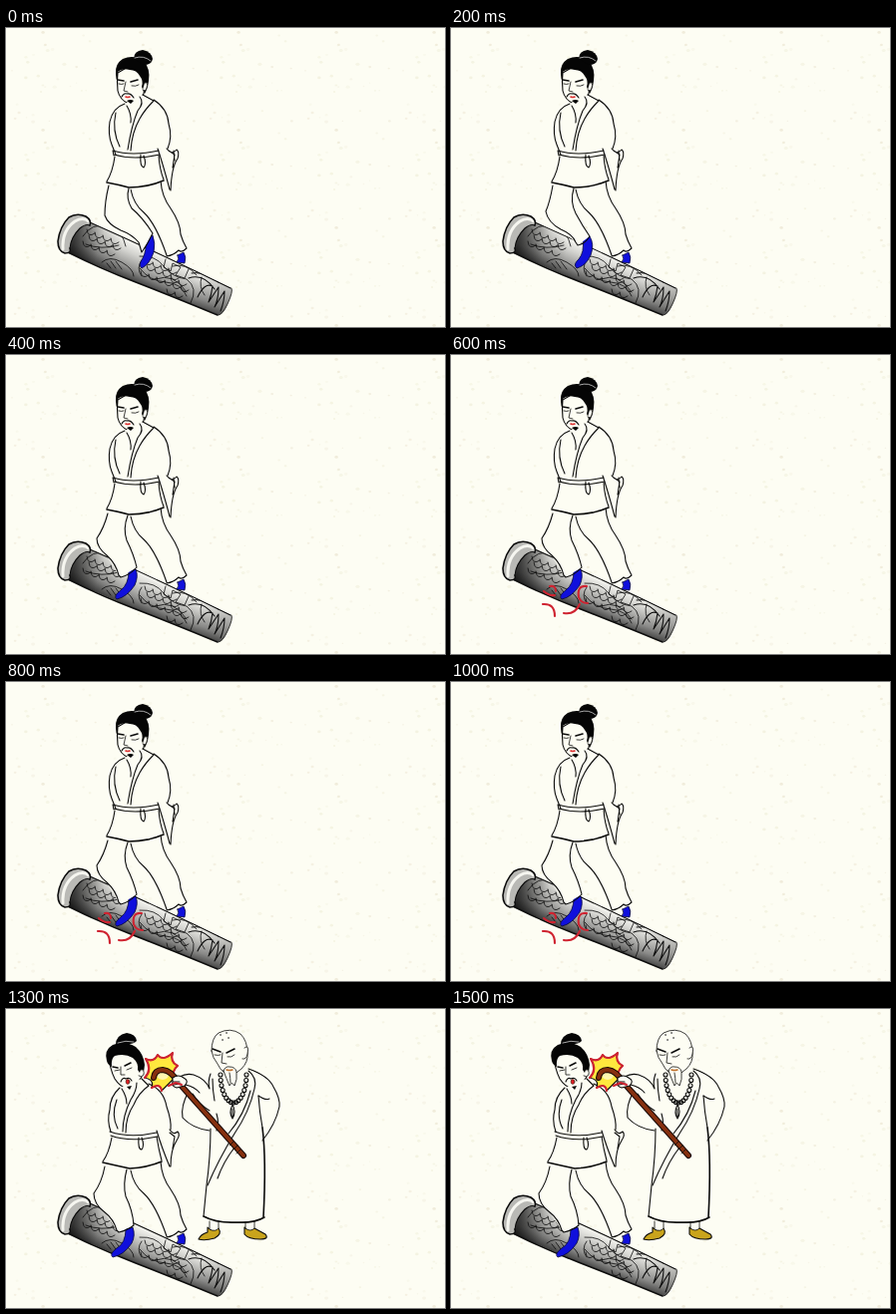
An HTML page for the animation above (1600 ms loop, 440 by 300 pixels).

```html
<!DOCTYPE html>
<html lang="en">
<head>
<meta charset="utf-8">
<title>Balancing practice</title>
<style>
  html, body { margin: 0; width: 100%; height: 100%; overflow: hidden; background: #fdfdf3; }
  svg { display: block; width: 100vw; height: 100vh; }
  .ink { fill: none; stroke: #0c0c0c; stroke-width: 1.1; stroke-linecap: round; stroke-linejoin: round; }
  .skin { fill: #fdfdf3; }
  .bold { stroke-width: 1.6; }
  .thin { stroke-width: .8; }
  .black { fill: #050505; stroke: none; }
  .shoe { fill: #1010dc; stroke: #08083c; stroke-width: .8; }
  .red { fill: none; stroke: #cf2330; stroke-width: 2.1; stroke-linecap: round; }
</style>
</head>
<body>
<svg viewBox="0 0 440 300" preserveAspectRatio="none">
  <defs>
    <pattern id="paper" width="98" height="98" patternUnits="userSpaceOnUse"></pattern>
    <linearGradient id="across" gradientUnits="userSpaceOnUse" x1="147" y1="222" x2="131" y2="259">
      <stop offset="0" stop-color="#fafaf5"/>
      <stop offset=".3" stop-color="#d2d2ce"/>
      <stop offset=".65" stop-color="#929290"/>
      <stop offset="1" stop-color="#2c2c2c"/>
    </linearGradient>
    <linearGradient id="along" gradientUnits="userSpaceOnUse" x1="66" y1="222" x2="224" y2="268">
      <stop offset="0" stop-color="#000" stop-opacity=".65"/>
      <stop offset=".16" stop-color="#000" stop-opacity=".15"/>
      <stop offset=".3" stop-color="#000" stop-opacity="0"/>
      <stop offset=".8" stop-color="#000" stop-opacity="0"/>
      <stop offset="1" stop-color="#000" stop-opacity=".2"/>
    </linearGradient>
    <path id="tube" d="M80 193L226 261Q228 264 222 277Q218 287 213 288L130 255L61 225Q60 206 80 193Z"/>
    <clipPath id="inTube"><use href="#tube"/></clipPath>
  </defs>
  <rect width="440" height="300" fill="#fdfdf3"/>
  <rect width="440" height="300" fill="url(#paper)"/>

  <g class="ink">
    <use href="#tube" fill="url(#across)" stroke="none"/>
    <use href="#tube" fill="url(#along)" stroke="none"/>
    <g clip-path="url(#inTube)" class="thin">
      <path id="scales"/>
      <path d="M77 209Q86 195 102 199Q117 203 120 219M80 217Q95 223 113 218M96 235Q104 228 116 235T128 249M101 236l4 5m0-7l5 7m0-7l6 8"/>
      <path d="M134 229Q150 228 158 239T181 252Q193 261 185 276M134 241Q144 254 160 255T181 269M160 232l-2 8l7 4l2-8l8 4l-5 8l9 3l4-9"/>
      <path d="M150 252Q168 245 181 265M136 233Q130 241 136 249M167 239Q180 235 191 248M196 250Q193 260 199 268"/>
      <path class="ink" d="M186 246Q202 244 213 255M183 251Q198 246 209 262M192 270Q199 255 207 259Q206 268 203 275L213 260Q213 272 209 280L219 264Q219 274 215 284"/>
    </g>
    <path d="M84 195Q156 227 225 261"/>
    <path class="bold" d="M62 225Q94 241 130 255T212 288"/>
    <path class="thin" d="M226 261Q228 264 222 277Q217 288 213 288"/>
    <path fill="#b9b9b5" stroke="none" d="M63 190Q54 199 52 214Q52 224 59 226Q66 226 64 221Q65 210 74 201Q80 196 84 198Q86 193 80 189Q71 185 63 190Z"/>
    <path d="M57 222Q56 203 69 194Q77 189 83 194" stroke="#f6f6f0" stroke-width="3"/>
    <path class="bold" d="M84 198Q86 193 80 189Q71 185 63 190Q54 199 52 214Q52 224 59 226Q66 226 64 221"/>
    <path d="M64 221Q65 210 74 201Q80 196 84 198"/>
    <path class="shoe" d="M172 228L178 225Q181 230 179 236L171 235Q174 232 172 228Z"/>
  </g>

  <g id="legs" class="ink">
    <path class="skin" stroke="none" d="M122 158L131 180Q148 192 160 228Q172 227 181 221Q176 202 168 187Q158 174 155 154Z"/>
    <path d="M125 162Q128 177 138 185Q150 196 161 228M155 153Q156 169 165 181Q175 196 175 207Q177 214 181 221Q176 226 173 223Q168 228 161 229"/>
    <path id="shoe" class="shoe"/>
    <path id="legFill" class="skin" stroke="none"/>
    <path id="legLine"/>
  </g>

  <g id="calm" class="ink">
    <path class="skin" d="M112 45Q111 53 112 63Q114 72 123 76Q132 75 138 66L140 47L124 38Z"/>
    <path class="skin" stroke="none" d="M119 76Q104 83 104 100L108 128L101 155Q126 163 158 154L154 126L164 120Q167 88 148 72L137 67Z"/>
    <path class="black" d="M110 46Q109 36 117 31Q128 26 138 33Q145 41 143 53Q142 61 139 66L136 59Q138 53 134 48Q131 42 124 42Q116 40 112 44Q112 50 112 55Q110 51 110 46Z"/>
    <path class="black" d="M128 31Q128 23 137 22Q146 24 147 31Q146 37 138 37Z"/>
    <path d="M129 30Q138 27 145 33" stroke="#eee" stroke-width=".7"/>
    <path class="skin thin" d="M139 55Q143 54 141 60Q140 64 137 62"/>
    <path class="bold" d="M112 52l6 1M125 54l7-2"/>
    <path class="thin" d="M113 56q3 1 5 0M126 58q4 1 7-1M120 54l-2 9l4 1"/>
    <path d="M116 69q2-4 5-3q4-1 7 4"/>
    <path d="M120 69q2 1 4 0" stroke="#d33" stroke-width="1.6"/>
    <path class="black" d="M121 73q4-2 7 0l-3 3z"/>
    <path d="M119 76Q107 80 104 94Q102 107 106 117L110 127M137 67L148 73Q139 82 134 91Q126 105 125 123M134 69Q139 75 132 83Q126 97 122 122M121 78Q126 86 125 95M148 72Q162 81 163 96Q167 109 162 121M110 85Q106 103 114 119"/>
    <path d="M107 123Q126 129 153 123M108 127Q128 133 154 127M107 123l1 5M135 127Q134 139 138 140Q141 136 138 128"/>
    <path d="M109 129Q107 144 101 154M153 128Q154 142 158 152"/>
    <path class="bold" d="M101 155Q112 157 123 160Q142 160 158 153"/>
    <path d="M161 121Q166 128 171 122Q174 124 172 131Q166 139 165 163M152 121Q158 139 164 162M163 123l6 4l-2 13M168 123l1 10"/>
  </g>

  <g id="marks" class="red">
    <path d="M93 237Q99 242 104 241M99 232Q105 231 105 237"/>
    <path d="M92 250Q104 249 104 262M113 259Q124 261 129 250M136 232Q126 231 128 243Q130 249 137 249"/>
  </g>

  <g id="struck" class="ink">
    <path class="skin" d="M103 47Q104 60 109 70Q114 78 122 80Q131 77 136 68L136 49L119 39Z"/>
    <path class="skin" stroke="none" d="M114 79Q104 88 104 108L106 128L97 154Q126 163 156 153L152 126L164 122Q167 98 150 80L136 70Z"/>
    <path class="black" d="M101 52Q98 41 107 36Q119 31 130 38Q138 45 139 56Q139 62 136 67L132 61Q133 54 127 49Q119 44 109 47Q105 50 106 58Q102 56 101 52Z"/>
    <path class="black" d="M110 36Q110 26 121 24Q130 25 131 32Q127 36 118 35Z"/>
    <path d="M112 34Q120 31 128 33" stroke="#eee" stroke-width=".7"/>
    <path class="skin thin" d="M135 61Q139 60 138 66Q136 69 133 67"/>
    <path class="bold" d="M107 58l5 1M119 57l6-3"/>
    <path class="thin" d="M109 62l5-1M121 61l5-2M115 58l0 8l4 0"/>
    <path d="M115 73q2-5 5-3q4-2 6 2"/>
    <ellipse id="mouth" cx="122" cy="73" rx="1.9" ry="2.4" stroke="#321" stroke-width=".6"/>
    <path class="black" d="M121 78l5-1l-2 4z"/>
    <path d="M114 79Q104 88 104 101Q101 112 105 123M136 70L143 77Q133 84 128 96Q120 108 120 124M131 74Q131 82 125 91Q117 107 117 123M116 80Q121 88 121 95M143 75Q158 81 161 98Q166 112 165 121M111 91Q105 107 112 120"/>
    <path d="M104 123Q124 130 151 124M105 127Q124 134 152 128M133 129Q132 141 136 141Q139 137 136 129"/>
    <path d="M106 129Q103 145 97 153M151 128Q153 141 156 152"/>
    <path class="bold" d="M97 154Q110 157 124 160Q142 159 156 153"/>
    <path d="M164 121Q168 127 172 123Q175 126 171 132Q165 141 165 158M151 122Q156 139 164 158M164 124l5 4l-2 12"/>

    <!-- teacher -->
    <g fill="#c9a41c">
      <path d="M202 219Q206 224 213 220Q217 226 209 230Q199 233 193 231Q195 226 202 224Z"/>
      <path d="M239 219Q243 223 249 220L260 226Q264 231 255 231Q243 231 239 226Z"/>
    </g>
    <path class="skin thin" d="M204 213v8q6 3 9-1v-7M240 214v6q5 4 9 0v-7"/>
    <path class="skin" stroke="none" d="M211 62L197 72L170 69L176 112L204 121L198 208Q226 217 259 209L257 131Q273 117 274 94Q265 68 242 60Z"/>
    <path d="M205 65Q202 73 204 80Q200 70 188 66Q181 64 174 68M207 70Q207 81 209 92M183 83Q175 97 177 109Q187 120 204 122M187 85Q194 96 204 102M180 76Q189 78 194 84"/>
    <path d="M243 60Q263 67 268 78Q275 90 274 98Q270 116 257 132M253 87Q254 103 257 119"/>
    <path class="bold" d="M257 119Q261 151 258 209"/>
    <path d="M205 120Q205 148 201 177L198 208"/>
    <path class="bold" d="M198 208Q211 215 231 214Q249 215 259 209"/>
    <path d="M243 62Q252 69 249 80Q244 103 229 125Q213 151 202 177M245 82Q239 106 223 125M229 139Q218 153 212 170M211 105Q214 115 211 122M253 87Q260 92 264 90"/>
    <path class="skin thin" d="M206 42Q206 29 213 24Q225 18 235 25Q242 32 242 44Q243 53 236 60L227 67Q217 66 212 55Q207 49 206 42Z"/>
    <path class="skin thin" d="M239 39Q244 35 242 45Q241 51 237 50"/>
    <path class="bold" d="M207 40l8 3M221 44l8-4"/>
    <path class="thin" d="M209 46q4 1 6 0M222 48q4 1 7-2M217 44l-1 10l5 1"/>
    <path d="M215 26h.1M221 24h.1M217 31h.1M223 29h.1" stroke-width="1.5"/>
    <path class="skin thin" d="M218 62Q220 57 224 58Q230 58 231 63Q232 71 229 77Q226 72 224 77Q221 70 218 62ZM224 64q1 6 1 10"/>
    <path d="M221 61q3 1 6 0" stroke="#c0702c" stroke-width="1.5"/>
    <path id="beads" class="skin"/>
    <path d="M227 96q-4 8 0 14q4-7 0-14M227 100v8"/>

    <!-- blow -->
    <path d="M140 50Q148 54 152 46Q157 53 167 44Q164 53 172 57Q166 62 168 70L156 82Q155 74 146 79Q149 71 139 69Q147 61 140 50Z" fill="#ffe83e"/>
    <path class="red" d="M139 69Q147 61 140 50Q148 54 152 46Q157 53 167 44Q164 53 172 57Q166 62 168 70M156 82Q155 74 146 79"/>
    <ellipse cx="157" cy="66" rx="6" ry="5" fill="#fff7b0" stroke="none"/>
    <path id="staff" d="M148 69Q149 61 157 61Q166 62 173 74L238 147" stroke="#160804" stroke-width="6"/>
    <path d="M148 69Q149 61 157 61Q166 62 173 74L238 147" stroke="#86300f" stroke-width="4"/>
    <path class="thin" d="M228 133l-4 4M232 137l-4 4M235 141l-4 4"/>
    <path class="skin" d="M167 69Q173 65 178 69Q184 72 179 77L171 79Q165 77 167 73ZM167 73l7 0M168 76l7-1"/>
    <path class="red" d="M163 77l7-3l6 2"/>
  </g>
</svg>
<script>
const $ = id => document.getElementById(id);
const STEP = 100, LOOP = 1600, HIT = 1100;

// Matching paths for the sliding leg; the last pose belongs to the blow.
const line = [
  'M103 158Q99 174 99 188Q102 197 115 203Q126 207 133 215L136 225Q142 217 147 206M123 161Q120 171 126 181Q137 190 147 206',
  'M102 158Q99 175 95 184Q97 195 110 202Q122 207 125 215L127 218Q134 217 139 209M123 161Q119 174 125 186Q132 199 139 209',
  'M102 159Q98 174 91 184Q91 193 101 201Q110 209 113 221L115 223Q124 221 131 213M122 161Q117 174 121 186Q128 200 131 213',
  'M99 158Q96 174 88 185Q88 196 99 204Q108 211 111 222L113 224Q122 222 128 217M121 161Q117 176 120 188Q127 202 128 217'
];
const fill = [
  'M103 157L99 188Q102 197 115 203L133 215L136 225L147 206Q137 190 126 181L124 158Z',
  'M102 157L95 184Q97 195 110 202L125 215L127 218L139 209Q132 199 125 186L124 158Z',
  'M102 157L91 184Q91 193 101 201L113 221L115 223L131 213Q128 200 121 186L123 158Z',
  'M99 157L88 185Q88 196 99 204L111 222L113 224L128 217Q127 202 120 188L122 158Z'
];
const shoe = [
  'M140 211L147 208Q150 216 148 225Q144 237 136 241Q132 238 137 231Q141 224 140 211Z',
  'M132 212L139 209Q144 217 140 228Q135 239 126 241Q122 237 128 232Q134 225 132 212Z',
  'M123 217L130 215Q133 222 129 231Q121 243 111 245Q107 242 115 236Q123 230 123 217Z',
  'M120 221L127 219Q130 227 126 235Q118 247 107 249Q103 246 111 240Q120 235 120 221Z'
];

function mix(a, b, k) {
  const to = b.match(/[\d.]+/g);
  let i = 0;
  return a.replace(/[\d.]+/g, n => (+n + (to[i++] - n) * k).toFixed(1));
}

function pose(list, t) {
  if (t >= HIT) return list[3];
  const p = Math.min(t / 200, 2), i = Math.min(Math.floor(p), 1);
  return mix(list[i], list[i + 1], p - i);
}

function decorate() {
  let seed = 4177, flecks = '', scales = '', beads = '';
  const rnd = () => (seed = seed * 16807 % 2147483647) / 2147483647;
  for (let i = 0; i < 34; i++) {
    const x = 3 + rnd() * 92, y = 3 + rnd() * 92, r = .6 + rnd() * 1.5;
    const tint = i % 3 ? '#e6e4c6' : '#dcd0b4';
    flecks += `<ellipse cx="${x}" cy="${y}" rx="${r}" ry="${r * .8}" fill="${tint}" opacity="${.15 + rnd() * .25}"/>`;
  }
  $('paper').innerHTML = flecks;

  for (const [x, y, cols, rows] of [[81, 202, 4, 3], [139, 232, 4, 3], [165, 250, 2, 3]])
    for (let r = 0; r < rows; r++)
      for (let c = 0; c < cols; c++)
        scales += `M${x + c * 8 - r * 2 + r % 2 * 4} ${y + c * 3 + r * 6}q1 9 8 4`;
  $('scales').setAttribute('d', scales);

  for (let i = 0; i <= 16; i++) {
    const a = Math.PI * i / 16;
    const x = 228 + 13 * Math.cos(a), y = 66 + 28 * Math.sin(a);
    beads += `M${x - 2} ${y}a2 2 0 1 0 4 0a2 2 0 1 0 -4 0`;
  }
  $('beads').setAttribute('d', beads);
}

function show(id, on) { $(id).style.display = on ? '' : 'none'; }

function draw(now) {
  const t = Math.floor(now % LOOP / STEP) * STEP;
  $('legLine').setAttribute('d', pose(line, t));
  $('legFill').setAttribute('d', pose(fill, t));
  $('shoe').setAttribute('d', pose(shoe, t));
  show('calm', t < HIT);
  show('struck', t >= HIT);
  show('marks', t >= 600 && t < HIT);
  $('mouth').setAttribute('fill', t < 1300 ? '#b5492c' : '#e01c24');
}

decorate();
draw(0);
let start;
requestAnimationFrame(function tick(now) {
  start ??= now;
  draw(now - start);
  requestAnimationFrame(tick);
});
</script>
</body>
</html>
```
